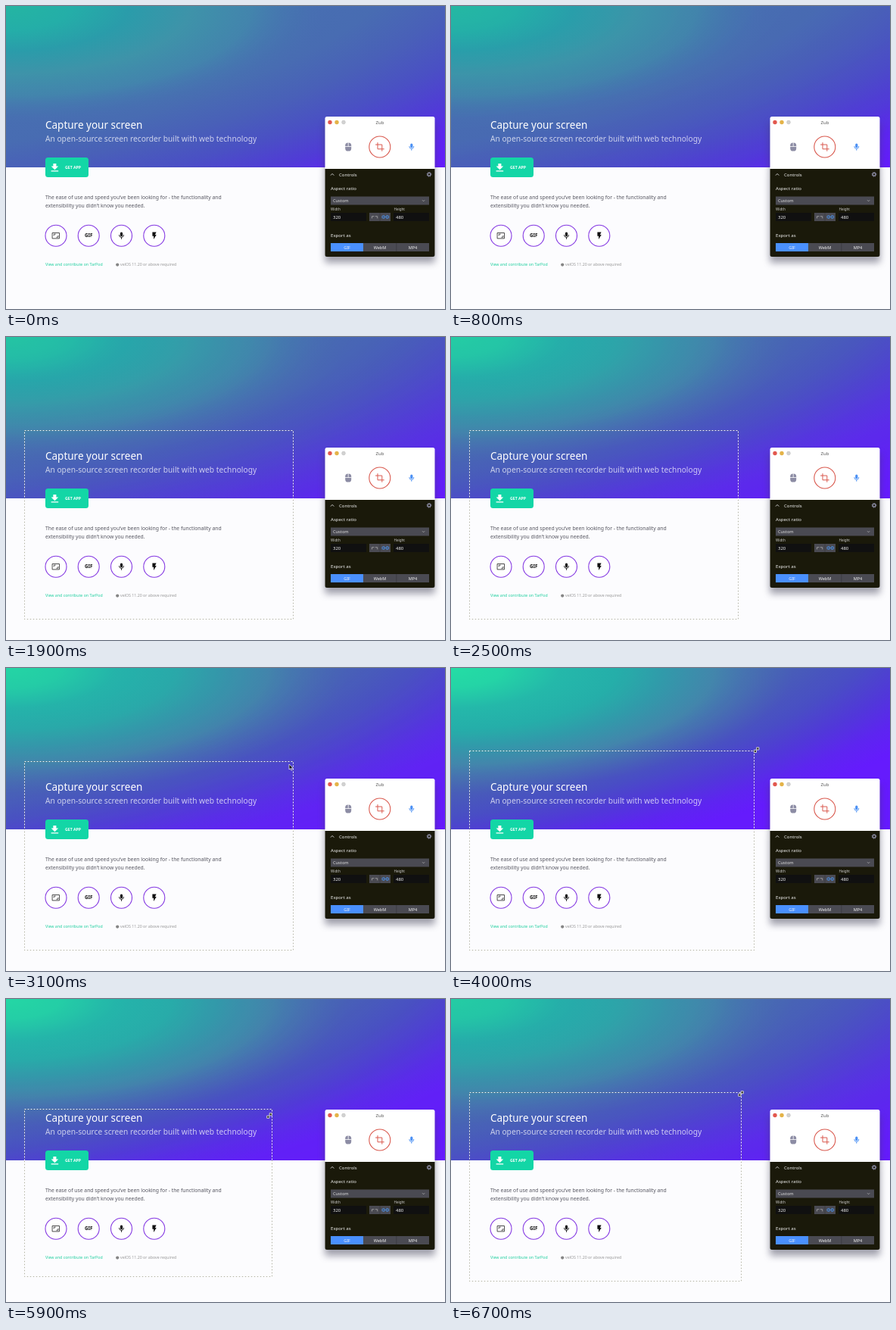
Write an HTML page that moves like this. It is 580 px wide and 400 px high and loops after 6.8 s.

```html
<!DOCTYPE html>
<html lang="en">
<head>
<meta charset="utf-8">
<title>Screen recorder</title>
<style>
html, body { margin: 0; width: 580px; height: 400px; overflow: hidden; background: #fcfcfe; }
svg { display: block; }
text { font-family: "Noto Sans", "Open Sans", sans-serif; }
.line { fill: none; stroke-linecap: round; stroke-linejoin: round; }
.bold { font-weight: 700; }
.medium { font-weight: 500; }
.mid { text-anchor: middle; }
.ring { fill: #fff; stroke: #8438e2; stroke-width: 1.1; }
.panel { filter: drop-shadow(0 8px 5px rgba(60, 60, 84, .48)); }
.control { fill: #4a4a52; }
.field { fill: #101010; }
</style>
</head>
<body>
<svg width="580" height="400" viewBox="0 0 580 400">
  <defs>
    <radialGradient id="calmBase" cx="-.7" cy="-.7" r="2.42"></radialGradient>
    <radialGradient id="vividBase" cx="-.7" cy="-.7" r="2.42"></radialGradient>
    <radialGradient id="calmCorner" cx="0" cy="0" r="1"></radialGradient>
    <radialGradient id="vividCorner" cx="0" cy="0" r="1"></radialGradient>
    <g id="mic">
      <rect x="-1.6" y="-4.6" width="3.2" height="5.8" rx="1.6"/>
      <path class="line" d="M-3 -.6a3 3 0 0 0 6 0M0 2.4V4.4" stroke="currentColor" stroke-width=".9"/>
    </g>
  </defs>

  <rect width="580" height="400" fill="#fcfcfe"/>
  <rect width="580" height="213" fill="url(#calmBase)"/>
  <rect width="580" height="213" fill="url(#calmCorner)"/>
  <g id="glow">
    <rect width="580" height="213" fill="url(#vividBase)"/>
    <rect width="580" height="213" fill="url(#vividCorner)"/>
  </g>

  <g fill="#fff">
    <text x="52" y="162" font-size="13.5">Capture your screen</text>
    <text x="52" y="179" font-size="10.2" fill-opacity=".72">An open-source screen recorder built with web technology</text>
    <rect x="52" y="200" width="57" height="26" rx="3.5" fill="#13d6a6"/>
    <path d="M62.4 208h4v3.6h2.8l-4.8 4.6-4.8-4.6h2.8zM59.6 217.2h9.6v1.4h-9.6z"/>
    <text class="bold" x="78" y="215.3" font-size="5.2">GET APP</text>
  </g>

  <g font-size="6.8" fill="#55555f">
    <text x="52" y="255">The ease of use and speed you’ve been looking for - the functionality and</text>
    <text x="52" y="266">extensibility you didn’t know you needed.</text>
  </g>

  <g id="rings"></g>
  <g fill="#111">
    <path class="line" d="M61.5 299.5h9v7.4h-9zM63.3 303v-1.8h2M68.8 303.4v1.8h-2" stroke="#222" stroke-width=".8"/>
    <text class="bold mid" x="109.2" y="305.4" font-size="6.2">GIF</text>
    <use href="#mic" x="152.5" y="303" color="#111"/>
    <path d="M193.4 298.4h5.2l-1.7 3.6h1.8l-3.6 6v-4.2h-1.7z"/>
  </g>

  <g font-size="5.25">
    <text class="medium" x="52" y="343.4" fill="#1fcf9f">View and contribute on TarPod</text>
    <circle cx="147.2" cy="341.6" r="2.1" fill="#858585"/>
    <text x="151" y="343.4" fill="#999">velOS 11.20 or above required</text>
  </g>

  <g class="panel">
    <rect x="421.5" y="146" width="145" height="185" rx="2.5" fill="#fff"/>
    <path d="M421.5 215h145v113.5a2.5 2.5 0 0 1-2.5 2.5h-140a2.5 2.5 0 0 1-2.5-2.5z" fill="#1a190a"/>
  </g>

  <circle cx="428" cy="153.5" r="2.7" fill="#e2574e"/>
  <circle cx="437" cy="153.5" r="2.7" fill="#e4b348"/>
  <circle cx="446" cy="153.5" r="2.4" fill="#d2d2d2" stroke="#bbb" stroke-width=".5"/>
  <text class="mid" x="494" y="155.8" font-size="6" fill="#555">Zub</text>

  <rect x="448.2" y="180.5" width="8" height="11" rx="3.6" fill="#8c8ca4"/>
  <path d="M448 185.5h8.5M452.2 180v5.5" stroke="#fff" stroke-width=".8"/>
  <circle cx="493.8" cy="186" r="14" fill="#fff" stroke="#d9594e" stroke-width="1.1"/>
  <path class="line" d="M491 180.5v8.3h8.3M488.500 183h8.3v8.3" stroke="#d9594e"/>
  <use href="#mic" x="535.8" y="186" fill="#4a90f4" color="#4a90f4"/>

  <g class="medium" fill="#f2f2f2">
    <path class="line" d="M429.2 223.3l1.9-1.9 1.9 1.9" stroke="#ddd" stroke-width=".9"/>
    <text x="440" y="224.5" font-size="6">Controls</text>
    <circle cx="559" cy="222.3" r="1.9" fill="none" stroke="#8f8fa8" stroke-width="1.3"/>
    <circle cx="559" cy="222.3" r="2.9" fill="none" stroke="#8f8fa8" stroke-dasharray="1.14"/>
    <text x="429" y="243" font-size="6.1">Aspect ratio</text>
    <rect class="control" x="429" y="251.5" width="130" height="11"/>
    <text x="432" y="259.2" font-size="5.7" fill="#ddd">Custom</text>
    <path class="line" d="M550.3 256.5l1.3 1.3 1.3-1.3" stroke="#bbb" stroke-width=".7"/>
    <g font-size="4.6" fill="#ccc">
      <text x="429" y="270">Width</text>
      <text x="512.5" y="270">Height</text>
    </g>
    <rect class="field" x="429" y="273" width="47" height="11"/>
    <rect class="field" x="512" y="273" width="47" height="11"/>
    <text x="432" y="280.5" font-size="6">320</text>
    <text x="515" y="280.5" font-size="6">480</text>
    <rect class="control" x="480" y="273" width="28" height="11"/>
    <path d="M494 273v11" stroke="#33333a" stroke-width=".6"/>
    <path class="line" d="M483.5 280v-2.3h2.5M488.2 277.7h2.5v2.3" stroke="#aaa" stroke-width=".8"/>
    <path class="line" d="M500 276.8h-1.4a1.7 1.7 0 0 0 0 3.4h1.4M502.6 276.8h1.4a1.7 1.7 0 0 1 0 3.4h-1.4M499.5 278.5h3.6" stroke="#4a9cff" stroke-width=".9"/>
    <text x="429" y="304.5" font-size="6.1">Export as</text>
    <rect class="control" x="429" y="313" width="130" height="11"/>
    <rect x="429" y="313" width="43" height="11" fill="#4a90ff"/>
    <path d="M515.8 313v11" stroke="#33333a" stroke-width=".6"/>
    <g class="mid" font-size="5.5">
      <text x="450.5" y="320.6">GIF</text>
      <text x="494" y="320.6">WebM</text>
      <text x="537.5" y="320.6">MP4</text>
    </g>
  </g>

  <g id="crop" fill="none" stroke-dasharray="2">
    <path stroke="#50502a" stroke-opacity=".42" stroke-dashoffset="2"/>
    <path stroke="#fff" stroke-opacity=".9"/>
  </g>
  <path id="arrow" d="M0 0v7l1.7-1.5 1.3 2.8 1.2-.6-1.2-2.6h2.3z" fill="#111" stroke="#fff" stroke-width=".7"/>
  <path id="resize" d="M-3.3 .1h3.2v3.2h-3.2zM.1-3.3h3.2v3.2h-3.2z" fill="#30302a" stroke="#f4f4e6" stroke-width=".8"/>
</svg>
<script>
const LOOP = 6800, STEP = 100;
const $ = id => document.getElementById(id);

// Rows of [distance from the centre, colour, opacity]
const ramps = {
  calmBase: [[1.3, '#4672b0'], [1.7, '#486cb2'], [1.85, '#4960b8'], [2, '#4a50c4'],
             [2.14, '#503cd6'], [2.25, '#5c28ee'], [2.4, '#641cfc']],
  vividBase: [[1.3, '#4672b0'], [1.53, '#486ab2'], [1.65, '#495cba'], [1.78, '#4a4cc6'],
              [1.9, '#5236dc'], [2, '#5e24f2'], [2.1, '#661aff']],
  calmCorner: [[0, '#24b5a2'], [.15, '#24aea8'], [.28, '#2a9caa'], [.42, '#3e93a9'],
               [.56, '#4288ac', .85], [.75, '#486bb2', 0]],
  vividCorner: [[0, '#24dfa6'], [.12, '#24d6a6'], [.25, '#24baaa'], [.38, '#25b0aa'],
                [.48, '#309caa'], [.6, '#428aab', .9], [.78, '#486bb2', 0]]
};
for (const id in ramps) {
  const radius = $(id).r.baseVal.valueInSpecifiedUnits;
  const scale = radius > 50 ? radius / 100 : radius;
  $(id).innerHTML = ramps[id].map(([d, colour, alpha = 1]) =>
    `<stop offset="${d / scale}" stop-color="${colour}" stop-opacity="${alpha}"/>`).join('');
}
$('rings').innerHTML = [66, 109.2, 152.5, 195.8].map(x => `<circle class="ring" cx="${x}" cy="303.3" r="14"/>`).join('');

// Tracks are rows of [time, value, value, ...]
const corner = [[3600, 379, 123, 373], [4600, 440, 83, 372], [4900, 436, 85, 372],
                [5900, 351, 145, 367], [6500, 383, 123, 372.5], [6800, 383, 123, 373]];
const pointer = [[2500, 330, 180], [3100, 374, 127], [3600, 379, 124], [4500, 438, 86],
                 [4900, 409, 90], [5700, 346, 156], [5900, 348, 154], [6500, 383, 125], [6800, 383, 125]];

const clamp = v => Math.max(0, Math.min(1, v));
const ease = p => p * p * (3 - 2 * p);

function sample(track, t) {
  let i = 0;
  while (i < track.length - 2 && t >= track[i + 1][0]) i++;
  const a = track[i], b = track[i + 1];
  const p = ease(clamp((t - a[0]) / (b[0] - a[0])));
  return a.slice(1).map((v, k) => v + (b[k + 1] - v) * p);
}

function draw(t) {
  $('glow').setAttribute('opacity', .5 - .5 * Math.cos(2 * Math.PI * t / 9200));

  const [right, top, bottom] = sample(corner, t).map(v => Math.round(v) + .5);
  const outline = `M24.5 ${top}H${right}V${bottom - 1}H24.5Z`;
  for (const path of $('crop').children) path.setAttribute('d', outline);
  $('crop').setAttribute('opacity', clamp((t - 1400) / 400));

  const [x, y] = sample(pointer, t);
  const dragging = t >= 3500;
  for (const id of ['arrow', 'resize']) $(id).setAttribute('transform', `translate(${x} ${y})`);
  $('arrow').setAttribute('opacity', dragging ? 0 : clamp((t - 2500) / 400));
  $('resize').setAttribute('opacity', dragging ? 1 : 0);
}

const start = performance.now();
function tick() {
  const t = (performance.now() - start) % LOOP;
  draw(Math.floor(t / STEP) * STEP);
  requestAnimationFrame(tick);
}
tick();
</script>
</body>
</html>
```
